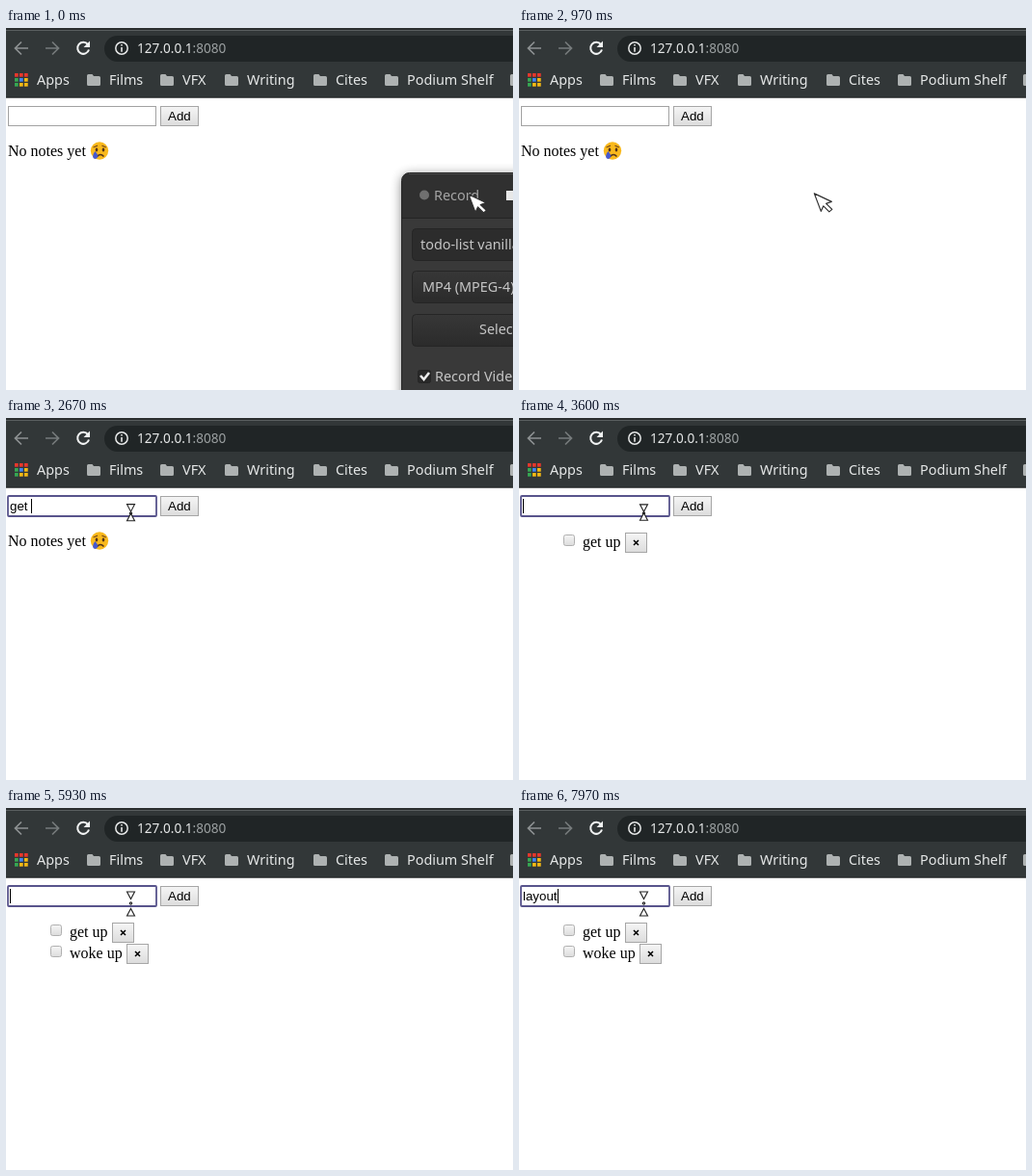
Write an HTML page that moves like this. It is 526x376 px and loops after 8 s.

```html
<!DOCTYPE html>
<html lang="en">
<head>
<meta charset="utf-8">
<title>Notes</title>
<style>
  html, body { margin: 0; width: 100%; height: 100%; overflow: hidden; background: #fff; }
  svg { display: block; width: 526px; height: 376px; }
  text { white-space: pre; }
  .ui { font-family: "Noto Sans", "Open Sans", sans-serif; font-size: 14.4px; fill: #e6e8e8; }
  .url { font-size: 13.6px; }
  .panel { font-size: 14.4px; font-weight: 500; fill: #c6c6c6; }
  .page { font-family: "Liberation Serif", serif; font-size: 16px; }
  .control { font-family: "Liberation Sans", Arial, sans-serif; font-size: 13.333px; }
</style>
</head>
<body>
<svg viewBox="0 0 526 376">
  <defs>
    <linearGradient id="face" x2="0" y2="1">
      <stop stop-color="#f5f5f5"/><stop offset="1" stop-color="#dcdcdc"/>
    </linearGradient>
    <linearGradient id="dark" x2="0" y2="1">
      <stop stop-color="#373737"/><stop offset="1" stop-color="#2b2b2b"/>
    </linearGradient>
    <filter id="shadow" x="-20%" y="-20%" width="140%" height="140%">
      <feGaussianBlur stdDeviation="6"/>
    </filter>
    <g id="folder">
      <path d="M0 1.5Q0 0 1.5 0H5.5L7 2H12.5Q14 2 14 3.5V10.5Q14 12 12.5 12H1.5Q0 12 0 10.5Z" fill="#aeb2b2"/>
    </g>
    <g id="note-controls">
      <rect x="46.5" y="121.5" width="11" height="11" rx="2" fill="url(#face)" stroke="#b0b0b0"/>
    </g>
    <g id="remove">
      <rect x=".5" y=".5" width="22" height="20" fill="url(#face)" stroke="#a6a6a6"/>
      <path d="M9 8L14 13M14 8L9 13" stroke="#000" stroke-width="1.5"/>
    </g>
  </defs>

  <rect width="526" height="376" fill="#fff"/>

  <!-- Browser toolbar -->
  <rect width="526" height="72.5" fill="#323738"/>
  <rect width="526" height="2" fill="#292d2e"/>
  <rect y="2" width="526" height="1" fill="#5a5f60"/>
  <rect y="71.5" width="526" height="1" fill="#202425"/>
  <rect x="102" y="8" width="440" height="27" rx="13.5" fill="#202526"/>
  <g fill="none" stroke-width="1.7">
    <path d="M23 21H10M16 14.5L9.5 21L16 27.5" stroke="#8d9192"/>
    <path d="M41 21H54M48 14.5L54.5 21L48 27.5" stroke="#767b7c"/>
    <path d="M85 17.2A6 6 0 1 0 86 22.5" stroke="#f1f3f3" stroke-width="2"/>
    <path d="M87 13.5V20H80.5Z" fill="#f1f3f3"/>
    <circle cx="120" cy="21" r="6.2" stroke="#e6e8e8" stroke-width="1.5"/>
    <path d="M120 17V18.6M120 20V24.7" stroke="#e6e8e8" stroke-width="1.6"/>
  </g>
  <text class="ui url" x="136" y="26">127.0.0.1<tspan fill="#9da2a3">:8080</tspan></text>
  <g id="bookmarks"></g>

  <!-- Form -->
  <rect id="field" fill="#fff"/>
  <text id="typed" class="control" x="4" y="96"></text>
  <rect id="caret" y="84" width="1" height="15"/>
  <rect x="160.5" y="81.5" width="39" height="20" fill="url(#face)" stroke="#a6a6a6"/>
  <text class="control" x="168" y="96">Add</text>

  <!-- Notes -->
  <g id="empty">
    <text class="page" x="2" y="133">No notes yet</text>
    <circle cx="97" cy="127.5" r="9.2" fill="#f9b91d"/>
    <path d="M90.5 124L95 122.2M99.5 122.2L104 124" fill="none" stroke="#805018" stroke-width="1.3"/>
    <ellipse cx="94" cy="126.5" rx="1.3" ry="1.9" fill="#54351c"/>
    <ellipse cx="101" cy="126.5" rx="1.3" ry="1.9" fill="#54351c"/>
    <path d="M94.5 133.5Q98 129.5 101.5 133.5" fill="none" stroke="#54351c" stroke-width="1.5"/>
    <path d="M92.5 128Q88.5 133 91 135.5Q94 137 95.5 133.5Q95.2 131 92.5 128Z" fill="#4658cf"/>
  </g>
  <g id="notes"></g>

  <!-- Recorder window -->
  <g id="recorder">
    <rect x="410" y="152" width="300" height="330" rx="9" opacity=".45" filter="url(#shadow)"/>
    <rect x="410.5" y="150.5" width="300" height="330" rx="8" fill="#393939" stroke="#252525"/>
    <path d="M411 197V158Q411 151 418 151H700V197Z" fill="#303030"/>
    <path d="M411 197.5H700" stroke="#242424"/>
    <path d="M418 151.5H700" stroke="#4b4b4b"/>
    <circle cx="434" cy="173.5" r="5" fill="#707070"/>
    <text class="ui panel" x="444" y="179" style="fill:#a5a5a5">Record</text>
    <rect x="519" y="169" width="10" height="10" fill="#e8e8e8"/>
    <g stroke="#252525">
      <rect x="421.5" y="208.5" width="270" height="33" rx="4" fill="#2c2c2c"/>
      <rect x="421.5" y="252.5" width="270" height="33" rx="4" fill="url(#dark)"/>
      <rect x="421.5" y="297.5" width="270" height="33" rx="4" fill="url(#dark)"/>
      <rect x="427.5" y="355.5" width="13" height="13" rx="2" fill="#292929"/>
    </g>
    <path d="M430 361L433.5 365L439 358" fill="none" stroke="#eee" stroke-width="2.6"/>
    <text class="ui panel" x="430" y="230">todo-list vanilla</text>
    <text class="ui panel" x="432" y="274">MP4 (MPEG-4)</text>
    <text class="ui panel" x="491" y="318">Select</text>
    <text class="ui panel" x="445" y="367">Record Video</text>
  </g>

  <!-- Pointers -->
  <path id="arrow" d="M0 0L18 8.5L12.3 10.5L18.5 16.5L15.5 19L9.5 13L7 18.5Z"
        fill="#fff" stroke="#303030" stroke-width="1.2" stroke-linejoin="round"/>
  <g id="beam" fill="#fff" stroke="#222" stroke-width="1.1">
    <path id="beam-top" d="M-4 -4H4L0 3.5Z"/>
    <circle r="1.1"/>
    <path id="beam-bottom" d="M-4 4H4L0 -3.5Z"/>
  </g>
</svg>

<script>
const LOOP = 8000;
const CLICK = 1400;
const BEAM_PERIOD = 510;
const BEAM_OPEN_AT = 5930;
const MOVE = { start: 600, end: 1300, from: [480, 173], via: [340, 215], to: [129, 99] };

// Each entry: text, time of every key, time of Enter
const entries = [
  { text: "get up", keys: [2080, 2230, 2420, 2580, 2800, 2960], enter: 3480 },
  { text: "woke up", keys: [4100, 4230, 4380, 4530, 4720, 4900, 5050], enter: 5560 },
  { text: "layout", keys: [6850, 7040, 7240, 7430, 7610, 7800], enter: Infinity },
];

const $ = id => document.getElementById(id);
const show = (element, visible) => element.style.display = visible ? "" : "none";
const place = (element, x, y) => element.setAttribute("transform", `translate(${x} ${y})`);
const clamp = x => Math.max(0, Math.min(1, x));
const ease = x => x * x * (3 - 2 * x);

function buildBookmarks() {
  const folders = [[84, "Films"], [160, "VFX"], [227, "Writing"], [319, "Cites"], [393, "Podium Shelf"], [523, ""]];
  const dotColors = ["#e8372c", "#e8372c", "#e8372c", "#36a852", "#4285f4", "#f6b913", "#36a852", "#f6b913", "#f6b913"];
  const dots = dotColors.map((color, i) =>
    `<rect x="${9 + i % 3 * 5}" y="${47 + Math.floor(i / 3) * 5}" width="3.7" height="3.7" fill="${color}"/>`);
  const items = folders.map(([x, name]) =>
    `<use href="#folder" x="${x}" y="48"/><text class="ui" x="${x + 23}" y="59">${name}</text>`);
  $("bookmarks").innerHTML = dots.join("") + '<text class="ui" x="32" y="59">Apps</text>' + items.join("");
}

function buildNotes() {
  const buttonX = [110, 125];
  $("notes").innerHTML = buttonX.map((x, i) => `<g transform="translate(0 ${i * 22})">
    <use href="#note-controls"/>
    <text class="page" x="66" y="134">${entries[i].text}</text>
    <use href="#remove" x="${x}" y="119"/></g>`).join("");
}

function drawField(t) {
  const focused = t >= CLICK;
  const field = $("field");
  const box = focused
    ? { x: 2, y: 81, width: 154, height: 21, rx: 1, stroke: "#58548c", "stroke-width": 1.8 }
    : { x: 2.5, y: 81.5, width: 153, height: 20, rx: 0, stroke: "#a2a2a2", "stroke-width": 1 };
  for (const name in box) field.setAttribute(name, box[name]);

  const { text, keys } = entries.find(entry => t < entry.enter);
  $("typed").textContent = text.slice(0, keys.filter(time => time <= t).length);
  $("caret").setAttribute("x", 4 + Math.round($("typed").getComputedTextLength()));

  const events = [CLICK, ...entries.flatMap(entry => [...entry.keys, entry.enter])];
  const lastEvent = Math.max(...events.filter(time => time <= t));
  show($("caret"), focused && (t - lastEvent) % 1000 < 500);
}

function drawNotes(t) {
  show($("empty"), t < entries[0].enter);
  [...$("notes").children].forEach((note, i) => show(note, t >= entries[i].enter));
}

function drawRecorder(t) {
  const closing = clamp((t - 20) / 170);
  const scale = 1 - 0.06 * closing;
  $("recorder").setAttribute("opacity", 1 - closing);
  $("recorder").setAttribute("transform", `translate(560 315) scale(${scale}) translate(-560 -315)`);
}

function drawPointer(t) {
  const s = ease(clamp((t - MOVE.start) / (MOVE.end - MOVE.start)));
  const [x, y] = [0, 1].map(axis =>
    MOVE.from[axis] * (1 - s) ** 2 + 2 * MOVE.via[axis] * s * (1 - s) + MOVE.to[axis] * s * s);
  const overField = x < 156 && y < 102;
  show($("arrow"), !overField);
  show($("beam"), overField);
  place($("arrow"), x, y);
  place($("beam"), x + 0.5, y);

  const open = 0.5 + 0.5 * Math.cos((t - BEAM_OPEN_AT) / BEAM_PERIOD * 2 * Math.PI);
  place($("beam-top"), 0, -5 - 3 * open);
  place($("beam-bottom"), 0, 3 + 6 * open);
}

function frame() {
  const t = performance.now() % LOOP;
  drawField(t);
  drawNotes(t);
  drawRecorder(t);
  drawPointer(t);
  requestAnimationFrame(frame);
}

buildBookmarks();
buildNotes();
frame();
</script>
</body>
</html>
```
